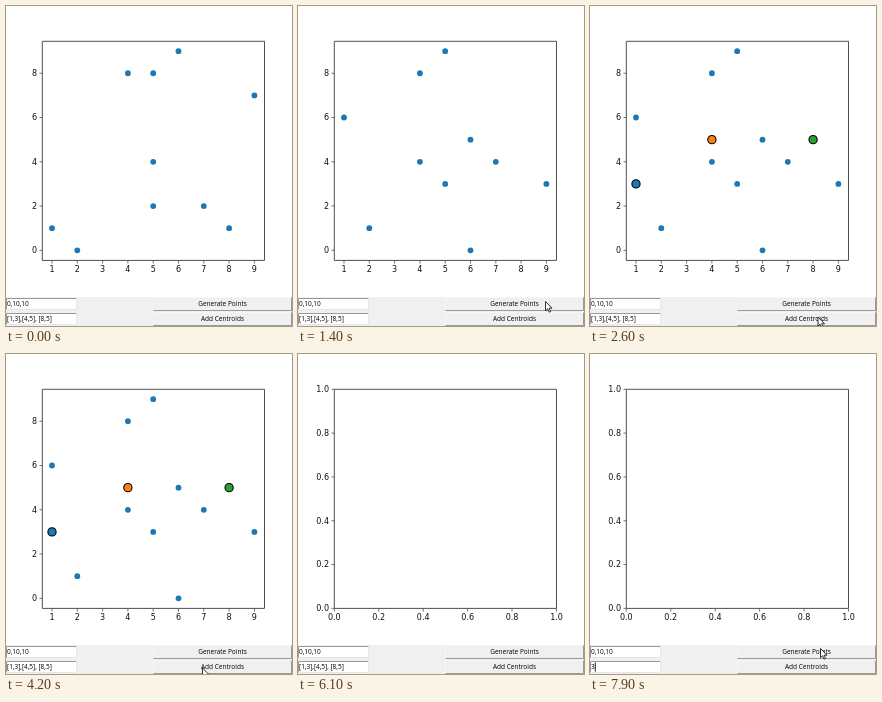
Write an HTML page that moves like this. It is 286 px wide and 320 px high and loops after 8000 ms.

```html
<!DOCTYPE html>
<html lang="en">
<head>
<meta charset="utf-8">
<title>Cluster plot</title>
<style>
html, body { margin: 0; width: 100%; height: 100%; overflow: hidden; background: #fff; }
svg { display: block; width: 286px; height: 320px; }
.tick { font: 8px "DejaVu Sans", sans-serif; fill: #111; }
.ui { font: 6.5px "Open Sans", "Noto Sans", sans-serif; fill: #000; }
</style>
</head>
<body>
<svg id="stage" viewBox="0 0 286 320"></svg>
<script>
const LOOP = 8000, STEP = 100;
const BLUE = '#1f77b4', ORANGE = '#ff7f0e', GREEN = '#2ca02c', INK = '#505050';

// y values of the points in each column x = 1, 2, 3...
const before = [[1], [0], [], [8], [8, 4, 2], [9], [2], [1], [7]];
const after = [[6], [1], [], [8, 4], [9, 3], [5, 0], [4], [], [3]];
const centroids = [[1, 3, BLUE], [4, 5, ORANGE], [8, 5, GREEN]];

const generateSpot = [247.5, 295.5], addSpot = [228, 311];

const px = x => 46 + (x - 1) * 25.3;
const py = y => 244.3 - y * 22.13;
const rect = (x, y, w, h, fill) => `<rect x="${x}" y="${y}" width="${w}" height="${h}" fill="${fill}"/>`;
const path = (d, stroke, width = 1) => `<path d="${d}" fill="none" stroke="${stroke}" stroke-width="${width}"/>`;
const text = (s, x, y, cls, anchor = 'start', extra = '') =>
  `<text x="${x}" y="${y}" class="${cls}" text-anchor="${anchor}" ${extra}>${s}</text>`;
const dot = (x, y, r, fill, extra = '') =>
  `<circle cx="${px(x)}" cy="${py(y)}" r="${r}" fill="${fill}" ${extra}/>`;

function glide(t, start, end, a, b) {
  const u = Math.min(1, Math.max(0, (t - start) / (end - start)));
  return a.map((v, i) => v + (b[i] - v) * u);
}

function arrowAt(t) {
  if (t < 1100 || (t >= 4400 && t < 7600)) return null;
  if (t < 1500) return glide(t, 1100, 1200, [276, 160], generateSpot);
  if (t < 4100) return glide(t, 1500, 1900, generateSpot, addSpot);
  if (t < 4400) return glide(t, 4100, 4300, addSpot, [165, 317]);
  return glide(t, 7600, 7900, [40, 311], [230.5, 294.5]);
}

const beamAt = t => t >= 6500 && t < 7200 ? glide(t, 6500, 6900, [60, 313], [1.5, 313]) : null;

function bevel(x, y, w, h, top, bottom) {
  const left = x + .5, up = y + .5, right = x + w - .5, down = y + h - .5;
  return path(`M${left} ${down}V${up}H${right}`, top) + path(`M${left} ${down}H${right}V${up}`, bottom);
}

function button(label, y, pressed) {
  const d = pressed ? .6 : 0;
  return (pressed ? bevel(147, y, 139, 14, '#8a8a8a', '#fff') : bevel(147, y, 139, 14, '#f6f6f6', '#999')) +
    text(label, 216.5 + d, y + 9.4 + d, 'ui', 'middle');
}

function field(label, y) {
  return rect(0, y, 71, 12, '#fff') + bevel(0, y, 71, 12, '#999', '#e6e6e6') +
    text(label, 1, y + 8.4, 'ui');
}

function xTick(x, label) {
  return path(`M${x} 254.5v3`, INK, .8) + text(label, x, 266.2, 'tick', 'middle');
}

function yTick(y, label) {
  return path(`M36.5 ${y}h-3`, INK, .8) + text(label, 31, y + 2.9, 'tick', 'end');
}

function axes(empty) {
  let s = path('M36.3 35.3H258.5V254.4H36.3Z', INK);
  if (empty) {
    for (let i = 0; i <= 5; i++) {
      const label = (i / 5).toFixed(1);
      s += xTick(36.3 + i * 44.44, label) + yTick(254.4 - i * 43.82, label);
    }
    return s;
  }
  for (let i = 1; i <= 9; i++) s += xTick(px(i), i);
  for (let i = 0; i <= 8; i += 2) s += yTick(py(i), i);
  return s;
}

function plot(t) {
  if (t >= 6100) return axes(true);
  let s = axes(false);
  (t < 1400 ? before : after).forEach((ys, i) => {
    for (const y of ys) s += dot(i + 1, y, 2.9, BLUE);
  });
  if (t >= 2600)
    for (const [x, y, c] of centroids) s += dot(x, y, 4.1, c, 'stroke="#000" stroke-width="1.1"');
  return s;
}

function entry(t) {
  const value = t < 7200 ? '[1,3],[4,5], [8,5]' : t < 7300 ? '' : '3';
  let s = field(value, 307);
  if (t >= 6700 && t < 7200) {
    const x = Math.max(.5, beamAt(t)[0] - 1), w = 45.5 - x;
    s += `<clipPath id="sel">${rect(x, 308, w, 10, '#000')}</clipPath>` + rect(x, 308, w, 10, '#1480d8') +
      text(value, 1, 315.4, 'ui', 'start', 'style="fill:#d4eaff" clip-path="url(#sel)"');
  }
  if (t >= 7200) s += rect(value ? 4.8 : 1, 308.5, .9, 9, '#000');
  return s;
}

function pointer(t) {
  const arrow = arrowAt(t), beam = beamAt(t);
  if (arrow) return `<path transform="translate(${arrow})" d="M0 0V9.2L2.1 7.3 3.6 10.7 5.1 10 3.6 6.7H6.5Z" fill="#fff" stroke="#000" stroke-width=".8"/>`;
  if (beam) return path(`M${beam[0] - 1.3} ${beam[1] - 4.5}h2.6m-1.3 0v9m-1.3 0h2.6`, '#111', .7);
  return '';
}

const stage = document.getElementById('stage');
let shown = -1;
function frame(now) {
  const t = Math.floor(now % LOOP / STEP) * STEP;
  if (t !== shown) {
    shown = t;
    stage.innerHTML = plot(t) + rect(0, 291, 286, 29, '#f0f0f0') +
      field('0,10,10', 292) + entry(t) +
      button('Generate Points', 291, t >= 1200 && t < 1400) +
      button('Add Centroids', 306, t >= 2400 && t < 2600) + pointer(t);
  }
  requestAnimationFrame(frame);
}
frame(0);
</script>
</body>
</html>
```
